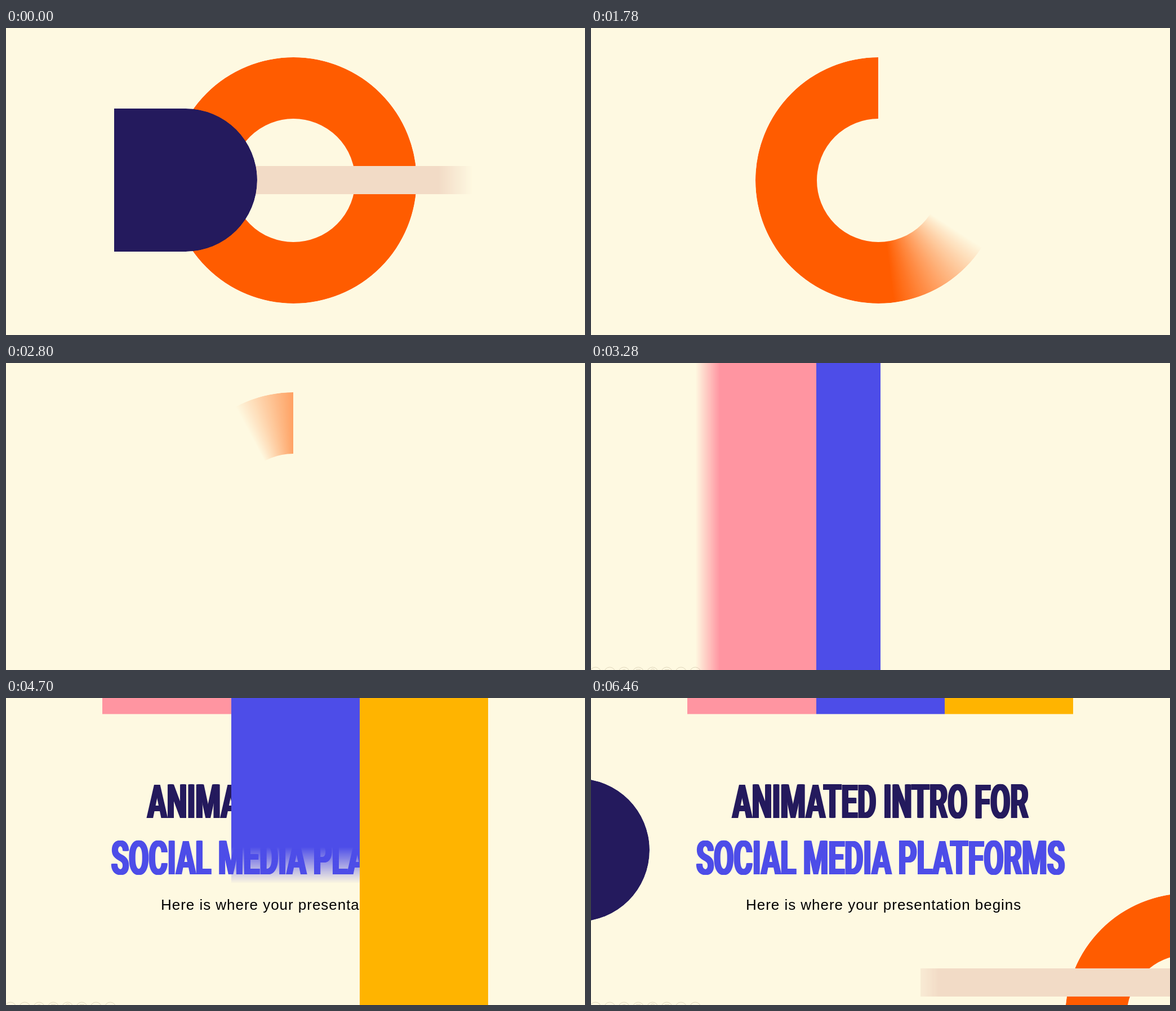
An HTML page for the animation above (7130 ms loop, 1028 by 545 pixels).

```html
<!DOCTYPE html>
<html lang="en">
<head>
<meta charset="utf-8">
<title>Animated intro</title>
<style>
  html, body { margin: 0; width: 100%; height: 100%; overflow: hidden; background: #fef9e1; }
  #stage { position: relative; width: 1028px; height: 545px; overflow: hidden; }
  #stage > * { position: absolute; margin: 0; white-space: nowrap; }

  #ring { left: 291.5px; top: 51.5px; width: 437px; height: 437px; box-sizing: border-box;
          border: 109.3px solid #ff5c00; border-radius: 50%; }
  #bar { left: 350px; top: 245px; width: 480px; height: 50px; background: #f2dbc6; }
  #tab { left: 192px; top: 143px; width: 254px; height: 254px; background: #241a5d;
         border-radius: 0 127px 127px 0; }

  /* Condensed heading with heavier stems */
  h1 { left: -200px; top: 135px; width: 1428px; text-align: center; color: #241a5d;
       font: 700 84px/100px Roboto, sans-serif; transform: scaleX(.607);
       text-shadow: 3px 0, -3px 0, 1.5px 0, -1.5px 0; }
  h1 span { color: #4d4de8; }
  p { left: 275px; top: 352px; font: 26px/30px "Liberation Sans", Arial, sans-serif;
      letter-spacing: .97px; color: #000; }

  #columns { left: 171px; top: 0; width: 685px; height: 545px; }
  #columns i { position: absolute; top: 0; height: 545px; }
  #columns i:nth-child(1) { left: 0; width: 229px; background: #ff95a1; }
  #columns i:nth-child(2) { left: 229px; width: 228px; background: #4d4de8; }
  #columns i:nth-child(3) { left: 457px; width: 228px; background: #ffb400; }

  #tools { left: 0; top: 535px; fill: none; stroke: #a89878; stroke-opacity: .35; }
</style>
</head>
<body>
<div id="stage">
  <div id="ring"></div>
  <div id="bar"></div>
  <div id="tab"></div>
  <h1>ANIMATED INTRO FOR<br><span>SOCIAL MEDIA PLATFORMS</span></h1>
  <p>Here is where your presentation begins</p>
  <div id="columns"><i></i><i></i><i></i></div>
  <svg id="tools" width="200" height="10"></svg>
</div>
<script>
const LOOP = 7130, REST = 6460;
const $ = s => document.querySelector(s);
const ring = $('#ring'), bar = $('#bar'), tab = $('#tab');
const columns = $('#columns'), tools = $('#tools'), texts = [$('h1'), $('p')];

tools.innerHTML = Array.from({ length: 8 }, (_, i) =>
  `<circle cx="${8 + i * 25.3}" cy="15" r="10"/>`).join('') +
  '<path d="M56 10l5-1M80 9h8M106 10a4 4 0 0 1 7 0M131 9.5h8"/>';

const progress = (t, start, length) => Math.min(1, Math.max(0, (t - start) / length));
const colours = entering => entering ? ['#000', '#0000'] : ['#0000', '#000'];

// Soft-edged straight wipe across `size` pixels
function wipe(angle, p, size, entering) {
  const [a, b] = colours(entering), soft = size / 8, lead = p * (size + soft);
  return `linear-gradient(${angle}deg, ${a} ${lead - soft}px, ${b} ${lead}px)`;
}

// Soft-edged clockwise wipe
function wheel(p, entering) {
  const [a, b] = colours(entering), lead = p * 410;
  return `conic-gradient(${a} ${lead - 50}deg, ${b} ${lead}deg)`;
}

function mask(el, value) {
  el.style.webkitMask = value;
  el.style.webkitMaskClip = el.style.webkitMaskOrigin = 'border-box';
}

function draw(t) {
  const outro = t > 4000;
  const place = (el, x, y) => el.style.transform = outro ? `translate(${x}px, ${y}px)` : '';
  place(bar, 235, 235);
  place(tab, -342, 0);
  place(ring, 550, 294.5);

  mask(bar, wipe(270, progress(t, outro ? 5990 : -56, 500), 480, outro));
  mask(tab, outro ? wipe(90, progress(t, 5490, 500), 254, true)
                  : wipe(270, progress(t, 438, 500), 254, false));
  mask(ring, outro ? wheel(progress(t, 5490, 500), true)
                   : wheel(progress(t, 938, 2000), false));

  // Columns open from the centre, left half first, then roll up one by one
  mask(columns,
    wipe(270, progress(t, 2945, 395), 343, true) + ' 0 0 / 343px 100% no-repeat, ' +
    wipe(90, progress(t, 3420, 400), 343, true) + ' 343px 0 / 343px 100% no-repeat');
  [...columns.children].forEach((col, i) => mask(col,
    'linear-gradient(#000, #000) 0 0 / 100% 28.5px no-repeat, ' +
    wipe(0, progress(t, 3960 + i * 500, 500), 517, false) + ' 0 28px / 100% 517px no-repeat'));

  for (const el of texts) el.style.visibility = t >= 3820 ? 'visible' : 'hidden';
  tools.style.visibility = t >= 3080 ? 'visible' : 'hidden';
}

const begin = performance.now();
function tick() {
  draw(Math.min((performance.now() - begin) % LOOP, REST));
  requestAnimationFrame(tick);
}
tick();
</script>
</body>
</html>
```
